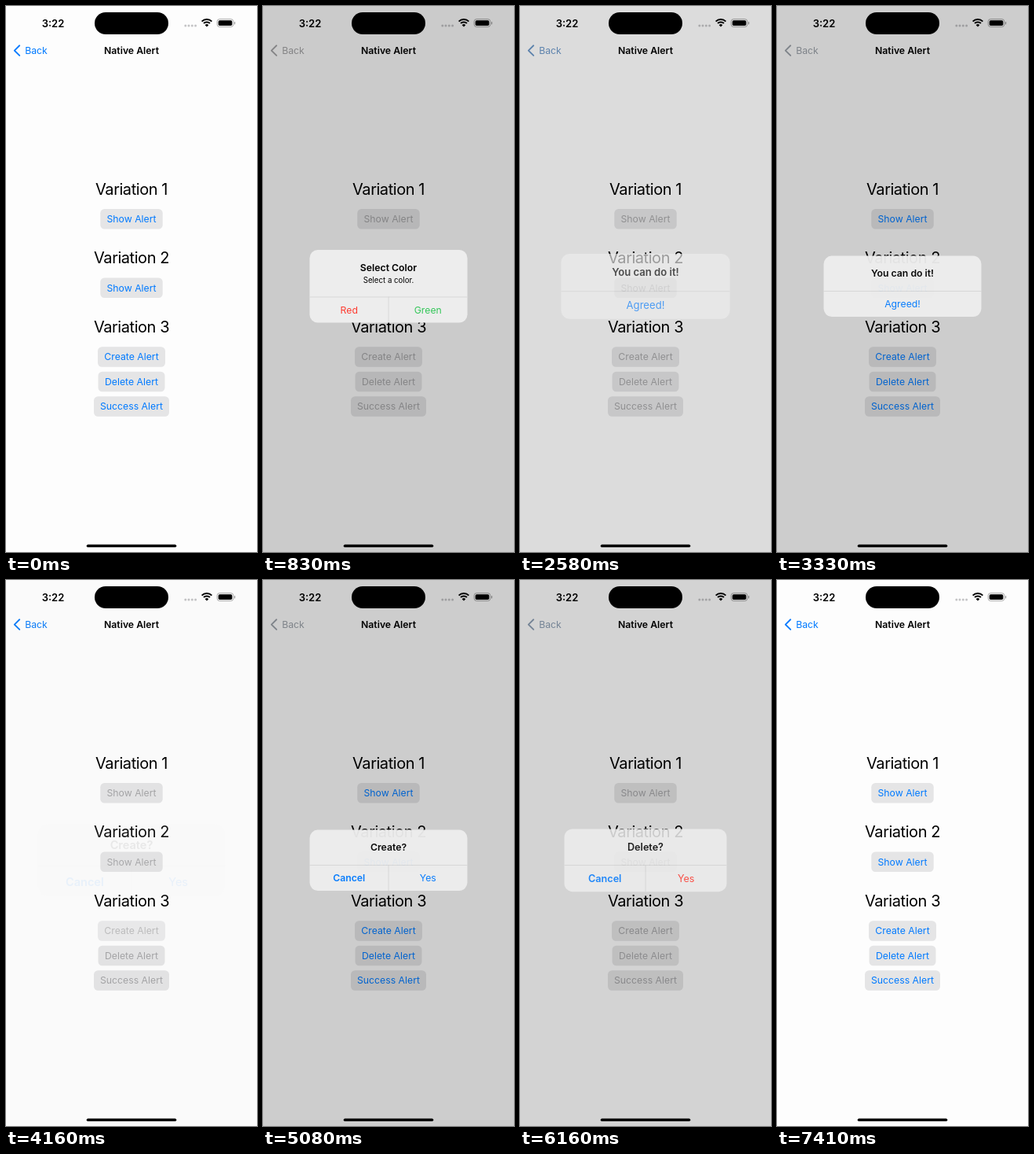
An HTML page that plays this animation: 320 by 694 pixels, repeating every 8000 ms.

```html
<!DOCTYPE html>
<html lang="en">
<meta charset="utf-8">
<title>Native Alert</title>
<style>
  html, body { margin: 0; height: 100%; overflow: hidden; background: #fdfdfd; }
  svg { display: block; font-family: Inter, sans-serif; }
  text { text-anchor: middle; }
  .heading { letter-spacing: -.022em; }
</style>
<svg id="stage" width="320" height="694" viewBox="0 0 320 694"></svg>
<script>
const LOOP = 8000, STEP = 1000 / 12;
const BLUE = [0, 122, 255], GREY = [165, 165, 167];
const CENTER_Y = 356.3, BODY = 12.25;
const blue = '#007aff', red = '#ff3b30', green = '#34c759';

// Text whose capitals are centred on y
const label = (str, x, y, { size = BODY, weight = 400, fill = '#000', extra = '' } = {}) =>
  `<text x="${x}" y="${y + size * .364}" font-size="${size}" font-weight="${weight}" fill="${fill}" ${extra}>${str}</text>`;
const box = (x, y, w, h, r, fill, extra = '') =>
  `<rect x="${x}" y="${y}" width="${w}" height="${h}" rx="${r}" fill="${fill}" ${extra}/>`;

const buttons = [
  ['Show Alert', 270.8, 79.5], ['Show Alert', 358.3, 79.5],
  ['Create Alert', 446, 86], ['Delete Alert', 477.5, 85], ['Success Alert', 509, 96],
];

const alerts = [
  { open: 472, close: 1568, button: 0, title: 'Select Color', message: 'Select a color.',
    actions: [['Red', red], ['Green', green]] },
  { open: 2486, close: 3318, button: 1, title: 'You can do it!', actions: [['Agreed!', blue]] },
  { open: 4148, close: 5068, button: 2, title: 'Create?', actions: [['Cancel', blue, 600], ['Yes', blue]] },
  { open: 6018, close: 6988, button: 3, title: 'Delete?', actions: [['Cancel', blue, 600], ['Yes', red]] },
];

function alertMarkup({ title, message, actions }) {
  const h = message ? 92.6 : 77.4, top = CENTER_Y - h / 2, bottom = top + h, rule = bottom - 33;
  const step = 201 / actions.length;
  return '<g class="alert">' + box(59.5, top, 201, h, 10.4, '#eee') +
    label(title, 160, top + 22.2, { weight: 600 }) +
    (message ? label(message, 160, top + 38.6, { size: 9.67 }) : '') +
    box(59.5, rule, 201, .7, 0, '#cfcfcf') +
    (actions.length > 1 ? box(159.7, rule, .7, 33, 0, '#cfcfcf') : '') +
    actions.map(([name, fill, weight], i) =>
      label(name, 59.5 + step * (i + .5), bottom - 16, { fill, weight })).join('') + '</g>';
}

const arc = r => {
  const d = r * Math.SQRT1_2;
  return `<path d="M${256 - d} ${26 - d}A${r} ${r} 0 0 1 ${256 + d} ${26 - d}"/>`;
};

stage.innerHTML =
  box(0, 0, 320, 694, 0, '#fdfdfd') +
  label('3:22', 60, 21.8, { size: 13, weight: 600 }) +
  [228.8, 233, 237.3, 241.6].map(x => `<circle cx="${x}" cy="25" r="1.5" fill="#c4c4c6"/>`).join('') +
  `<g fill="none" stroke="#000" stroke-width="2">${arc(9)}${arc(5.6)}</g>
   <path d="M256 26.6l-2.3-2.4a3.3 3.3 0 0 1 4.6 0z"/>` +
  box(269.2, 16.7, 20.6, 9.8, 3, 'none', 'stroke="#a0a0a0" stroke-width=".9"') +
  box(270.7, 18.2, 17.6, 6.8, 1.8, '#000') + box(291, 20, 1.2, 3.4, .6, '#a0a0a0') +
  `<g id="back"><path d="M17.2 50.3L10.8 56.6L17.2 62.9" fill="none" stroke="currentColor" stroke-width="1.9" stroke-linecap="round" stroke-linejoin="round"/>` +
  label('Back', 38.5, 56.6, { fill: 'currentColor' }) + '</g>' +
  label('Native Alert', 160, 56.4, { weight: 600 }) +
  [1, 2, 3].map(n => label('Variation ' + n, 160, 145 + 87.6 * n, { size: 20, extra: 'class="heading"' })).join('') +
  buttons.map(([name, y, w]) => '<g class="button">' + box(160 - w / 2, y - 12.7, w, 25.4, 5.2, '#e5e5e6') +
    label(name, 160, y, { fill: 'currentColor' }) + '</g>').join('') +
  box(0, 0, 320, 694, 0, '#000', 'id="dim"') +
  box(113, 8, 94, 28, 14, '#000') + box(102.7, 684.4, 114.6, 3.6, 1.8, '#000') +
  alerts.map(alertMarkup).join('');

const back = document.getElementById('back'), dim = document.getElementById('dim');
const buttonEls = [...stage.querySelectorAll('.button')];
const alertEls = [...stage.querySelectorAll('.alert')];

// Critically damped spring, 0 to 1
const spring = ms => {
  const x = Math.max(0, ms) * .0228;
  return 1 - (1 + x) * Math.exp(-x);
};
const tint = p => `rgb(${BLUE.map((c, i) => c + (GREY[i] - c) * p)})`;

function draw(t) {
  let shade = 0, disabled = false;
  buttonEls.forEach(el => el.setAttribute('opacity', 1));
  alerts.forEach(({ open, close, button }, i) => {
    const shown = spring(t - open), alpha = shown * (1 - spring(t - close));
    const scale = 1.2 - .2 * shown;
    alertEls[i].setAttribute('opacity', alpha);
    alertEls[i].setAttribute('transform',
      `translate(160 ${CENTER_Y}) scale(${scale}) translate(-160 ${-CENTER_Y})`);
    shade += alpha;
    disabled ||= t >= open && t < close;
    if (t > open - 30) buttonEls[button].setAttribute('opacity', .7 + .3 * shown);
  });
  dim.setAttribute('opacity', .2 * shade);
  back.style.color = tint(shade);
  buttonEls.forEach(el => el.style.color = tint(+disabled));
}

// The picture advances twelve times a second, on times rounded down to 10 ms
function tick() {
  const t = performance.now() % LOOP;
  draw(Math.floor((t + 8) / STEP) * STEP);
  requestAnimationFrame(tick);
}
tick();
</script>
</html>
```
